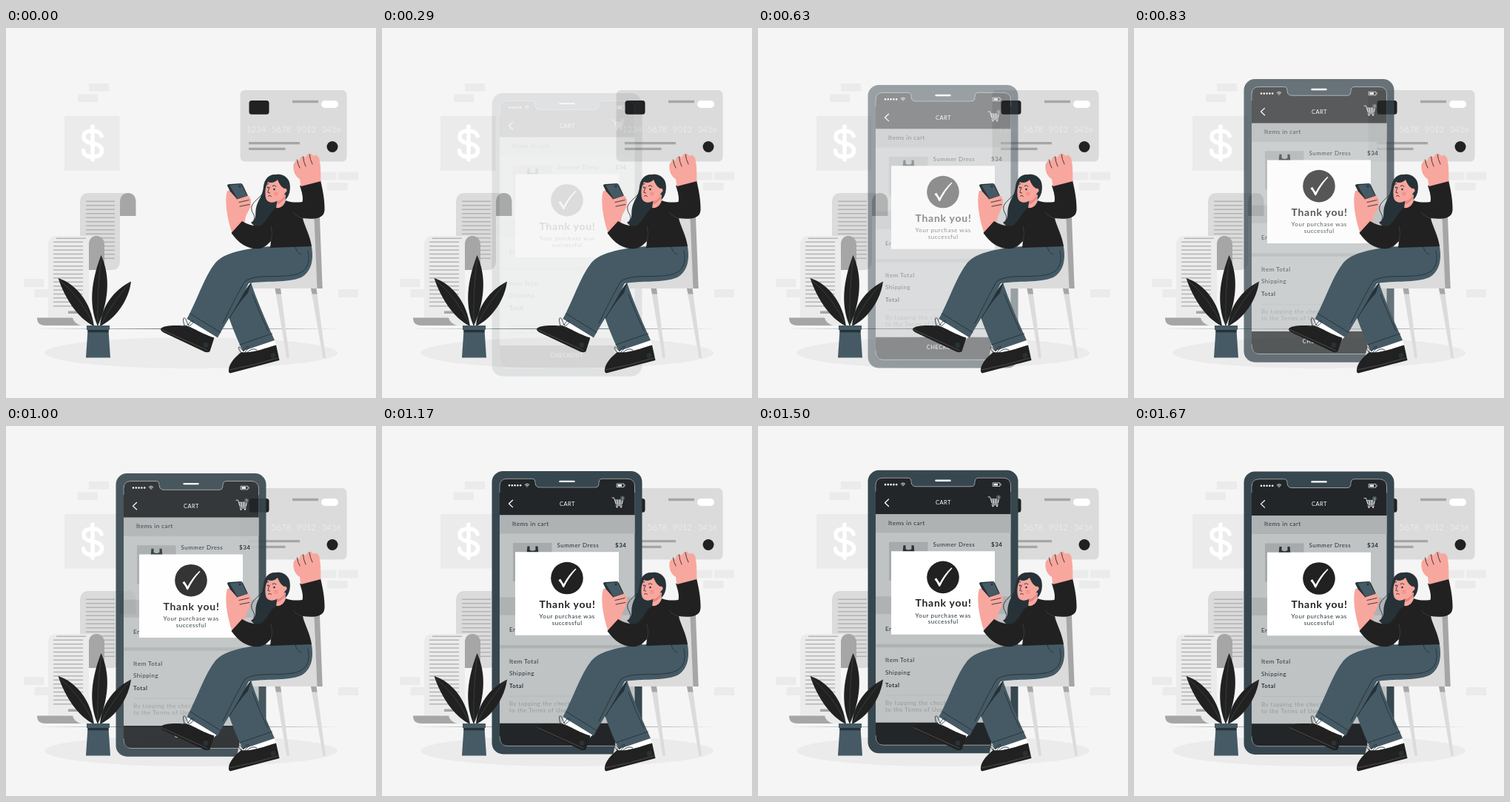
An HTML page for the animation above (1.71 s loop, 500 px wide and 500 px high).

```html
<!DOCTYPE html>
<html lang="en">
<head>
<meta charset="utf-8">
<title>Order confirmed</title>
<style>
  html, body { margin: 0; width: 100%; height: 100%; overflow: hidden; background: #f5f5f5; }
  svg { display: block; width: 100%; height: 100%; }
  text { font: 8px Lato, sans-serif; letter-spacing: .5px; fill: #263238; }
  .bold { font-weight: 700; }
  .mid { text-anchor: middle; }
  .white { fill: #fff; }
  .pale { fill: #ebebeb; }
  .light { fill: #dbdbdb; }
  .gray { fill: #a6a6a6; }
  .black { fill: #212121; }
  .ink { fill: #263238; }
  .slate { fill: #455a64; }
  .skin { fill: #f8a79e; }
  .line { fill: none; stroke: #263238; stroke-width: .9; stroke-linecap: round; stroke-linejoin: round; }
  .wire { fill: none; stroke: #fff; stroke-linecap: round; stroke-linejoin: round; }
</style>
</head>
<body>
<svg viewBox="0 0 500 500">
  <!-- wall and floor -->
  <path class="pale" d="M112 75h27v10.500h-27zM97 89.500h27v10.500h-27zM420 194.500h26.500v11h-26.500zM449 194.500h27v11h-27zM434 209h27.500v10.500h-27.500zM24 339h27v11h-27zM38.500 353h27v11h-27zM449 353h27v11h-27z"/>
  <ellipse class="pale" cx="250" cy="439" rx="198" ry="21"/>
  <path class="ink" d="M41 406.200L250 405.900 450 406.200 250 406.700z"/>

  <!-- dollar panel -->
  <path class="pale" d="M79 119h74.500v73.500H79z"/>
  <path class="wire" stroke-width="5.500" d="M117 133v45M129 146Q127 139 117 139Q105 139 105 147Q105 154 117 156Q129.500 158 129.500 165.500Q129.500 174 117 174Q105 174 104.500 165.500"/>

  <!-- receipts -->
  <path class="light" d="M100 236Q100 223 112 223H165L154 240V314Q154 327 143 327H100z"/>
  <path class="gray" d="M154 254V236C154 228 158 223 165 223S175.500 228 175.500 236V254z"/>
  <path d="M127.500 233.500V313" stroke="#b3b3b3" stroke-width="39" stroke-dasharray="1.400 4.100"/>
  <path class="pale" d="M57 293Q57 281 69 281H122L112 296V402H100Q91 400 90 391H57z"/>
  <path class="gray" d="M112 327V293C112 286 115 281 122 281S133 286 133 293V327zM42 391.500H90Q92 400 102 402H53Q42 402 42 391.500zM84 382.500h13v3.500H84z"/>
  <path d="M84 288.500V378" stroke="#b5b5b5" stroke-width="40" stroke-dasharray="1.500 3.900"/>
  <path d="M68 284.200h40" stroke="#b5b5b5" stroke-width="1.400"/>

  <!-- bank card -->
  <rect class="light" x="316.500" y="84" width="144" height="96.500" rx="6"/>
  <rect class="black" x="328.500" y="98" width="27" height="18.800" rx="3.500"/>
  <rect class="white" x="426" y="98" width="23" height="10" rx="5"/>
  <path class="gray" d="M387 97.700h35v3.500h-35zM328 154h69v3.300h-69zM328 161.700h49.500v3.200H328z"/>
  <text x="325" y="140.500" style="font-size:11px;font-weight:300;letter-spacing:.2px;word-spacing:4.400px;fill:#f5f5f5">1234 5678 9012 3456</text>
  <circle class="black" cx="441" cy="160.500" r="7.500"/>

  <!-- checkout phone -->
  <g id="phone" opacity="0">
    <rect x="148.500" y="61.400" width="203" height="382.600" rx="15" fill="#37474f"/>
    <rect x="159" y="71.800" width="182.500" height="361" rx="10" fill="#bfc3c4"/>
    <path d="M159 121V82Q159 71.800 169 71.800H203Q207 71.800 207 77T212 83.500H288Q293 83.500 293 78T297 71.800H331Q341.500 71.800 341.500 82V121z" fill="#232628"/>
    <path d="M159 402.300H341.500V423Q341.500 432.800 331 432.800H169Q159 432.800 159 423z" fill="#232628"/>
    <path d="M203 71.800Q207 71.800 207 77T212 83.500H288Q293 83.500 293 78T297 71.800V70H203z" fill="#37474f"/>
    <path class="wire" stroke-width=".6" opacity=".7" d="M159 90V82Q159 71.800 169 71.800H203Q207 71.800 207 77T212 83.500H288Q293 83.500 293 78T297 71.800H331Q341.500 71.800 341.500 82V90M159 420Q159 432.800 169 432.800H331Q341.500 432.800 341.500 420"/>
    <path class="wire" stroke-width="2.400" d="M240.500 75.400h19"/>
    <path class="wire" stroke-width="2.600" stroke-dasharray="0 3.800" d="M172 80.800h16"/>
    <path class="wire" stroke-width=".9" d="M193.200 79.700q2.800-2.400 5.600 0M194.500 81.200q1.500-1.200 3 0M196 82.500v.1"/>
    <path class="wire" stroke-width=".7" d="M317.500 78.500h9.500v4.600h-9.500zM328.300 80.200v1.200"/>
    <path class="white" d="M318.500 79.500h5.500v2.600h-5.500z"/>
    <path class="wire" stroke-width="1.300" d="M176.500 100.700l-5 4.700 5 4.700"/>
    <text class="mid white" x="250.500" y="108" style="font-size:7.500px">CART</text>
    <path class="wire" stroke-width=".8" d="M311 97.500h2.500l3 9h7.500l1.500-6h-11M315 102.500h10M315.800 104.500h9M318 100.500l.8 6M321.500 100.500v6M316 108.300h8.500"/>
    <circle class="white" cx="317.500" cy="110" r="1"/><circle class="white" cx="323" cy="110" r="1"/>
    <circle cx="325" cy="98" r="3" fill="#455a64"/>
    <text class="mid white" x="325.200" y="99.500" style="font-size:4px;letter-spacing:0">1</text>

    <path d="M159 121h182.500v25H159zM159 232h182.500v24H159zM159 296.500h182.500v4.500H159z" fill="#aeb2b3"/>
    <path d="M172 365.500h156" stroke="#b2b6b7" stroke-width=".8"/>
    <text x="176" y="135.300">Items in cart</text>
    <path d="M177 158.500h52.500v52H177z" fill="#a6aaab"/>
    <path class="ink" d="M196.500 163h3v5q4 2.500 8 0v-5h3l1 10h-16z"/>
    <text x="236.500" y="164.300">Summer Dress</text>
    <text class="bold" x="315" y="164.300">$34</text>
    <text x="172" y="278.500">Enter code</text>
    <text x="172" y="321">Item Total</text>
    <text x="172" y="337.700">Shipping</text>
    <text class="bold" x="172" y="354.200" style="font-size:7.800px">Total</text>
    <g opacity=".28"><text x="172" y="378.500">By tapping the checkout button</text><text x="172" y="387.500">to the Terms of Use and Sale</text></g>
    <text class="mid white" x="250" y="418.500" style="font-size:7.500px">CHECKOUT</text>

    <path class="white" d="M180 170.800h140v112.500H180z"/>
    <circle class="black" cx="250" cy="206" r="21.800"/>
    <path class="white" d="M238.500 209L241 207 245.500 214Q252 201.500 261.500 193L262.500 194Q252 205.500 246 218.500H244.500Q242 212.500 238.500 209z"/>
    <text class="mid bold" x="250.500" y="246" style="font-size:14px;letter-spacing:.75px;fill:#212121">Thank you!</text>
    <text class="mid" x="250.200" y="260.200" style="letter-spacing:.6px">Your purchase was</text>
    <text class="mid" x="250.200" y="269">successful</text>
  </g>

  <!-- plant -->
  <path class="black" d="M124 403C114 380 112 350 128.500 307C139 330 142 362 124 403zM119 403C97 392 80 366 70.500 338C96 346 115 372 119 403zM127 403C129 376 146 354 169 342.500C166 368 148 393 127 403z"/>
  <path class="line" style="stroke:#455a64;stroke-width:.5" d="M124 400Q123 355 128.500 312M118 400Q102 365 73 341M129 400Q144 370 167 345"/>
  <path class="slate" d="M109 402h31v6h-1.500L141 445.500H108L110.500 408H109z"/>
  <path class="ink" d="M110.500 408h28l.2 3.200h-28.400z"/>

  <!-- chair -->
  <path class="light" d="M328 350L396 250 419 245 424 352H330zM363.500 352h7.500L383 446h-3.500zM412 352h7.500L432 446h-3.500zM324 385L328 387 315.500 446H312z"/>
  <path class="gray" d="M416 245L423.500 244 427.700 352H420.500zM363.500 352h7.500l1 7.500h-7zM412 352h7.500l1 7.500h-7z"/>

  <!-- far leg -->
  <path class="white" d="M318 432L362 420 365.500 430 319 441z"/>
  <path class="slate" d="M299 385L331 344C338 365 349 391 363 422L320 436.500C312 420 306 405 299 385z"/>
  <path class="ink" d="M299 387L332 343 327 358Q314 372 302 393z"/>
  <path class="line" d="M316 428L359.500 413M333 360Q343 386 354 409"/>
  <path class="black" d="M301 462C301 454 310 444 318 438C332 440 349 433 365 428.500L369.500 449 303 466.500Q300.500 466 301 462z"/>
  <path class="line" style="stroke:#777;stroke-width:.5" d="M302 462Q335 456 368.500 445.500"/>
  <path class="line" d="M319 440C311 431 314 427 321 437C325 428 333 428 323 438M325 439q8-8 14-4"/>
  <circle class="ink" cx="361" cy="442.500" r="3.500"/>

  <!-- near leg -->
  <path class="white" d="M246 392L286 416 281 421 243 403z"/>
  <path class="slate" d="M358 295L412.500 293C416.500 313 413 329 399 337C381 345 350 341 328 345C316 370 300 393 286 418.500L244.500 393C258 368 268 337 281 320C292 303 325 298 358 295z"/>
  <path class="line" d="M249 386L290 411.500M408 301C412 319 406 331 387 334C362 338 338 332 323 342C313 358 302 382 293 399M391 296Q393 304 399 306"/>
  <path class="black" d="M209 406.500C213 402 227 401.500 240 402.500C251 402 258 411 281.500 418.500L275.500 437Q272 440 265 436L213 411.500Q208.500 409 209 406.500z"/>
  <path class="line" style="stroke:#777;stroke-width:.5" d="M210 407.500L272 435.500"/>
  <path class="line" d="M242 404C236 390 242 386 246 402C251 390 259 397 247 403M237 404q7-6 14 5"/>
  <circle class="ink" cx="270" cy="428.500" r="3.500"/>

  <!-- hair, face, neck -->
  <path class="ink" d="M365 198C355 197 349 205 348 214C347 227 340 233 338 243C336 252 340 257 331 263L344 276 364 246 378 232C385 225 385 212 382 206C378 199 371 197 365 198z"/>
  <path class="line" d="M347 224C337 234 330 238 332 246C333 251 338 254 335 259"/>
  <path class="skin" d="M367 228L378 225 377 241Q372 246 365 244z"/>
  <path class="skin" d="M354 208C350 215 350 224 351 229C352 236 361 238 367 233C373 230 376 226 377 223C381 221 380 216 376 217C372 215 369 210 367 205C363 209 358 210 354 208z"/>
  <path d="M366 234Q373 233 377 226L377 230Q372 237 366 238z" fill="#e58780"/>
  <path class="line" d="M352 211.500l3-1M360 213.500q3-2 5 .5M356.500 215q-3 5-2.500 7.500l2.500.5M354.500 227q2-1.500 4 .3"/>
  <circle class="ink" cx="354" cy="215.500" r="1.100"/><circle class="ink" cx="362.500" cy="218" r="1.300"/>
  <circle cx="365" cy="224" r="2.800" fill="#ef8178" opacity=".5"/>

  <!-- hand with phone -->
  <path class="skin" d="M299 220C296 230 296.500 249 305.500 277L323 262C323 250 331 246 331 237Q332 227 324 226C316 218 304 219 299 220z"/>
  <path class="ink" d="M299 213Q299 211 302 211L317 210Q319 210 320 212L329 231 311 232 303 221z"/>
  <path class="slate" d="M302 212.500L318 211 327.500 230 313 231z"/>
  <circle class="ink" cx="316" cy="214" r="1.500"/>
  <path class="skin" d="M299 220L304 222 312 231 326 226Q331 228 328 232 332 235 329 239 332 243 325 246L306 247z"/>
  <path class="line" d="M312 231L326 226.500M315 235.500L328 232.500M316 241L329 238.500"/>

  <!-- sweater -->
  <path class="black" d="M319 261L304.500 277C315 292 328 300 343 298C349 297 354 292 358 288L357 297 413 295C411 280 403 267 401 257C416 259 430 258 430.500 246C431 234 428 218 425 206L397 213C400 222 402 229 400.500 235C392 236 385 236 378 233C376 240 371 244 365 243C357 248 351 260 344 267Q332 269 319 261z"/>
  <path class="ink" d="M349 236L364 243Q358 249 354 256T344 267L333 264z"/>
  <path class="line" style="stroke:#4b4b4b;stroke-width:.6" d="M358 288Q361 279 358 268M401 257Q392 255 388 249"/>

  <!-- raised fist -->
  <path class="skin" d="M398.500 214L397 204C389 200 387 188 389 183Q393 177 397 180C396 174 402 171 405 175C407 169 413 168 415 173C420 169 424 175 424 181C426 190 425 199 425.500 207z"/>
  <path class="line" d="M393.500 178Q394 184 397 189M401.500 174Q402 181 405 187M410 171Q411 178 414 184"/>
</svg>
<script>
  const LOOP = 1710, FRAME = 1000 / 24, LAST = 40, RISE = 30;
  const phone = document.getElementById("phone");

  const bez = (a, b, s) => 3 * s * (1 - s) ** 2 * a + 3 * s * s * (1 - s) * b + s ** 3;

  // cubic-bezier(.36, -.01, .5, 1.38): rises past its rest and settles back
  function ease(x) {
    let lo = 0, hi = 1;
    for (let i = 0; i < 24; i++) {
      const mid = (lo + hi) / 2;
      if (bez(.36, .5, mid) < x) lo = mid; else hi = mid;
    }
    return bez(-.01, 1.38, (lo + hi) / 2);
  }

  function draw(now) {
    const step = Math.min(LAST, Math.floor((now % LOOP + 5) / FRAME));
    const p = ease(step / LAST);
    phone.setAttribute("opacity", Math.max(0, Math.min(1, p)));
    phone.setAttribute("transform", `translate(0 ${RISE * (1 - p)})`);
    requestAnimationFrame(draw);
  }
  requestAnimationFrame(draw);
</script>
</body>
</html>
```
